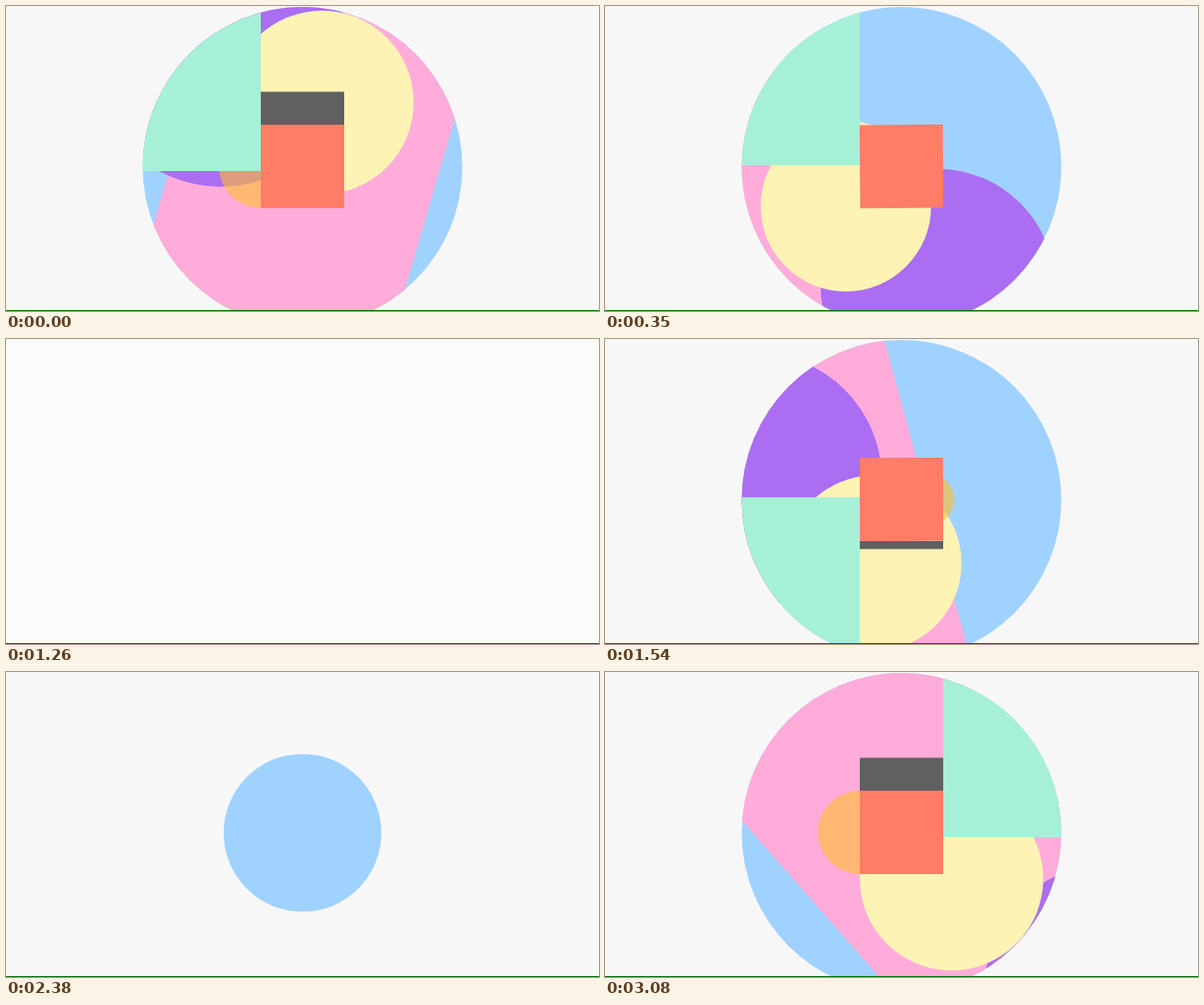
Recreate the animation shown at these times as an HTML page with a canvas. Size 640 px wide and 329 px high, loop 3150 ms.

```html
<!DOCTYPE html>
<html lang="en">
<head>
<meta charset="utf-8">
<title>Shapes</title>
<style>
  html, body { margin: 0; width: 100%; height: 100%; overflow: hidden; background: #f7f7f7; }
  canvas { display: block; }
</style>
</head>
<body>
<canvas id="stage" width="640" height="329"></canvas>
<script>
const ctx = document.getElementById('stage').getContext('2d');
const LOOP = 3150, STEP = 70;
const CX = 320, CY = 173, SIDE = 90, HALF = SIDE / 2;

// cut: hard change to the empty stage; base: when the shapes start to grow.
// band: normal angle in degrees and centre offset; dir: -1 = up/left, 1 = down/right.
const scenes = [
  { cut: -1050, base: -940, band: [16.3, 3.3], purple: [232, 55], yellow: [341, 104], green: 'TL', dir: -1 },
  { cut: 70, base: 178, band: [145, 180], purple: [359, 302], yellow: [260, 216], green: 'TL', dir: -1 },
  { cut: 1190, base: 1335, band: [-15.1, -107], purple: [163, 151], yellow: [290, 242], green: 'BL', dir: 1 },
  { cut: 2240, base: 2433, band: [-41.3, 19], purple: [549, 345], yellow: [374, 223], green: 'TR', dir: -1 }
];

function ease(t, delay, tau) {
  return t <= delay ? 0 : 1 - Math.exp((delay - t) / tau);
}

function rect(x, y, w, h, color) {
  ctx.fillStyle = color;
  ctx.fillRect(x, y, w, h);
}

function disc(x, y, r, color) {
  ctx.fillStyle = color;
  ctx.beginPath();
  ctx.arc(x, y, r, 0, Math.PI * 2);
  ctx.fill();
}

function rotated(angle, draw) {
  ctx.save();
  ctx.translate(CX, CY);
  ctx.rotate(angle * Math.PI / 180);
  draw();
  ctx.restore();
}

function drawGreen(corner, k) {
  const h = 197 * k;
  const x = corner[1] === 'L' ? 0 : CX + HALF;
  const y = corner[0] === 'T' ? -19 : 365 - h;
  rect(x, y, 275, h, '#a7f0d8');
}

function drawScene(s, t) {
  const grow = ease(t, 0, 65);
  ctx.save();
  ctx.beginPath();
  ctx.arc(CX, CY + 0.5, 172.5 * ease(t, -70, 25), 0, Math.PI * 2);
  ctx.clip();

  rect(0, 0, 640, 329, '#a0d2ff');
  const w = 140 * grow;
  rotated(s.band[0], () => rect(s.band[1] - w, -500, 2 * w, 1000, '#ffacda'));
  disc(...s.purple, 140 * ease(t, 107, 28), '#ab6df2');
  disc(...s.yellow, 99 * grow, '#fcf3b5');

  const r = HALF * ease(t, 140, 65);
  disc(CX + s.dir * r, CY, r, 'rgba(255,190,45,0.6)');
  drawGreen(s.green, ease(t, 34, 40));

  const slide = 35.5 * ease(t, 187, 65);
  if (slide > 0) {
    const y = s.dir < 0 ? CY - HALF - slide : CY + HALF;
    rect(CX - HALF, y, SIDE, slide, '#606060');
  }

  const k = ease(t, -13, 30), side = SIDE * k;
  rotated(-180 * (1 - k), () => rect(-side / 2, -side / 2, side, side, '#ff7c66'));
  ctx.restore();
}

function render(now) {
  const t = Math.floor((now % LOOP) / STEP) * STEP;
  const s = scenes.filter(c => c.cut <= t).pop();
  const local = t - s.base;
  const empty = local <= -70;
  rect(0, 0, 640, 329, empty ? '#fbfbfb' : '#f7f7f7');
  if (!empty) drawScene(s, local);
  rect(0, 328, 640, 1, '#007000');
}

const start = performance.now();
function tick() {
  render(performance.now() - start);
  requestAnimationFrame(tick);
}
tick();
</script>
</body>
</html>
```
